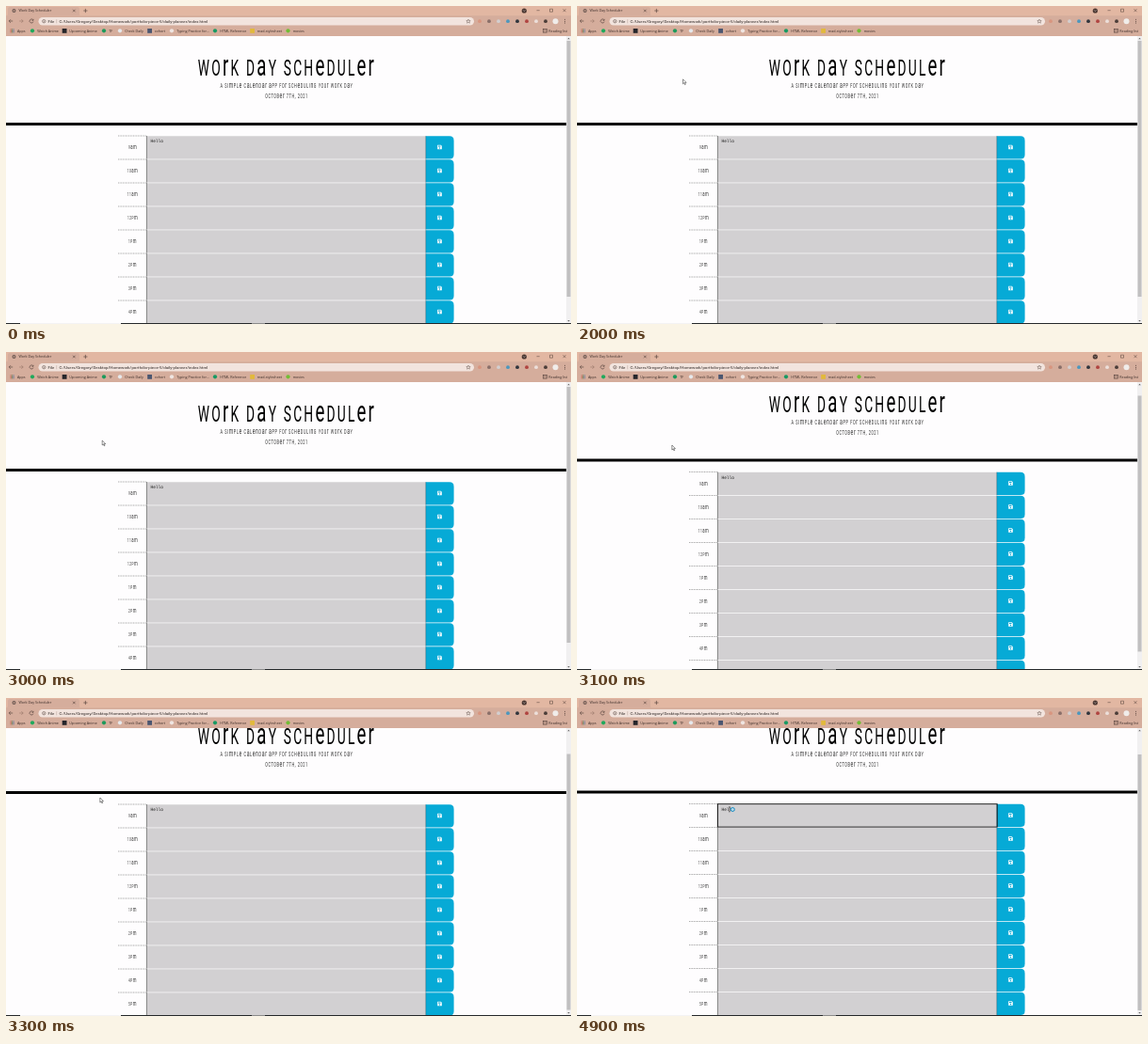
An HTML page for the animation above (5000 ms loop, 600x338 px).

```html
<!DOCTYPE html>
<html lang="en">
<head>
<meta charset="utf-8">
<title>Work Day Scheduler</title>
<style>
  html, body { margin: 0; width: 100%; height: 100%; overflow: hidden; background: #fff; }
  svg { display: block; width: 100vw; height: 100vh; }
  .ui { font-family: "Open Sans", "Noto Sans", sans-serif; font-size: 3.7px; fill: #3b2d29; }
  .url { font-family: Roboto, sans-serif; font-size: 4.4px; fill: #2d2523; }
  .display { font-family: Roboto, "Noto Sans", sans-serif; letter-spacing: .16em; text-anchor: middle; fill: #333; }
  .display .tall { font-size: 1.35em; }
  .title { fill: #000; }
  .note { font-family: "DejaVu Sans Mono", "Liberation Mono", monospace; font-size: 4.5px; fill: #222; }
</style>
</head>
<body>
<svg id="stage" viewBox="0 0 600 338"></svg>
<script>
const LOOP = 5000, STEP = 100, MAX_SCROLL = 25.5;
const ROW_TOP = 138, ROW_HEIGHT = 25;
const HOURS = ["9am", "10am", "11am", "12pm", "1pm", "2pm", "3pm", "4pm", "5pm"];

const rect = (x, y, w, h, fill, extra = "") =>
  `<rect x="${x}" y="${y}" width="${w}" height="${h}" fill="${fill}" ${extra}/>`;
const dot = (x, y, r, fill, extra = "") =>
  `<circle cx="${x}" cy="${y}" r="${r}" fill="${fill}" ${extra}/>`;
const line = (d, color, width = .6, extra = "") =>
  `<path d="${d}" fill="none" stroke="${color}" stroke-width="${width}" ${extra}/>`;
const label = (x, y, text, cls = "ui") => `<text x="${x}" y="${y}" class="${cls}">${text}</text>`;

// Condensed unicase lettering: a, e, m, n and r keep their small form at capital height.
function display(x, y, size, text, cls = "") {
  const letters = text.replace(/[aemnr]+|[^aemnr]+/g, part =>
    /[aemnr]/.test(part) ? `<tspan class="tall">${part}</tspan>` : part.toUpperCase());
  return `<text class="display ${cls}" font-size="${size}" xml:space="preserve"
    transform="translate(${x} ${y}) scale(.6 1)">${letters}</text>`;
}

function saveIcon(x, y) {
  return `<g transform="translate(${x} ${y})">
    <path d="M-2.3-2.2h3.6l1 1v3.4h-4.6z" fill="#fff"/>
    ${rect(-1.5, -1.5, 2.5, 1.1, "#06aad6")}${dot(0, 1, .7, "#06aad6")}</g>`;
}

function row(hour, i) {
  const y = ROW_TOP + i * ROW_HEIGHT;
  return line(`M119 ${y}H149`, "#777", .6, 'stroke-dasharray="1 .6"') +
    display(134.5, y + 14, 5.2, hour) +
    rect(149.5, y + .3, 296.5, 24.3, "#d2d0d2") +
    line(`M149.4 ${y}v24.7`, "#555", .7) +
    `<path d="M446 ${y + .3}h25q4.6 0 4.6 4.6v15q0 4.6-4.6 4.6h-25z" fill="#06aad6"/>` +
    line(`M445.8 ${y + .2}v24.5`, "#266f83", .6) +
    saveIcon(460.5, y + 12);
}

function page() {
  return display(298.5, 74, 23, "Work Day Scheduler", "title") +
    display(298, 87, 6.4, "A simple calendar app for scheduling your work day") +
    display(298, 98.3, 6.4, "October 7th, 2021") +
    rect(0, 124, 595, 3, "#000") +
    HOURS.map(row).join("") +
    label(153.5, 145, "Hello", "note") +
    `<rect id="focus" x="149.4" y="138.2" width="296.8" height="24.4" fill="none" stroke="#111" stroke-width=".9"/>`;
}

function bookmarks() {
  const items = [
    [28, "#1fa95b", "Watch Anime"], [62, "#25262b", "Upcoming Anime"], [104, "#1c9a5b", "TF"],
    [121, "#e6e9ec", "Check Daily"], [152.5, "#4b5670", "cohort"], [176, "#efe6e2", "Typing Practice for..."],
    [222, "#179a63", "HTML Reference"], [261.5, "#e2b93c", "read-stylesheet"], [299.5, "#72bd35", "movies"]
  ];
  let out = "";
  for (let i = 0; i < 9; i++)
    out += rect(4.6 + i % 3 * 1.5, 24.4 + Math.floor(i / 3) * 1.5, 1, 1, ["#b9513f", "#557b50", "#4b6c9c"][i % 3]);
  out += label(12, 27.8, "Apps");
  items.forEach(([x, color, text], i) => {
    out += i % 3 === 1 ? rect(x - 2.3, 24, 4.8, 4.8, color) : dot(x, 26.3, 2.1, color);
    out += label(x + 5.2, 27.8, text);
  });
  return out + rect(570.5, 24.5, 4, 3.6, "none", 'stroke="#4c3a34" stroke-width=".6"') +
    line("M571.4 25.7h2.3M571.4 27h2.3", "#4c3a34", .4) + label(576.3, 27.8, "Reading list");
}

function browser() {
  const ink = "#4c3a34";
  const extensions = ["#d8957f", "#8a6f69", "#d3cfd0", "#4d97bd", "#30353d", "#b04441", "#ecdfda", "#4b3d39"];
  return rect(0, 0, 600, 32, "#d5ad9c") + rect(0, 0, 600, 10.2, "#e2b7a2") +
    `<path d="M0 10.5q2 0 2-2V3q0-2 2-2h72q2 0 2 2v5.5q0 2 2 2z" fill="#d5ad9c"/>` +
    dot(8.5, 5, 2, "#6b5953") + dot(8.5, 5, 1, "#b99484") +
    label(13.5, 6.4, "Work Day Scheduler") +
    line("M71 3.7l2.6 2.6m0-2.6l-2.6 2.6M82.3 5h4.2M84.4 2.9v4.2", ink) +
    dot(550.3, 5, 2.6, "#4a3731") + line("M549.3 4.5l1 1 1-1", "#fff", .5) +
    line("M563.5 4.7h3.2M577.5 3.2h3v3h-3zM591.5 3.2l3 3m0-3l-3 3", ink, .5) +
    line("M7.2 16H3.2m1.8-1.8L3.2 16 5 17.8", ink) +
    line("M14.2 16h4m-1.8-1.8l1.8 1.8-1.8 1.8", "#947266") +
    line("M28.7 14.8a2 2 0 1 0 .3 1.8M29 13.8v1.5h-1.5", ink) +
    rect(34.5, 12, 462.5, 8.6, "#f2e4de", 'rx="4.3"') +
    dot(40.3, 16.2, 1.7, "none", `stroke="${ink}" stroke-width=".5"`) + line("M40.3 16v1.2M40.3 15v.4", ink, .5) +
    label(44.5, 17.7, "File", "url") + line("M53.7 14.2v4.2", "#a69189", .4) +
    label(56.5, 17.7, "C:/Users/Gregory/Desktop/Homework/portfolio-piece-5/daily-planner/index.html", "url") +
    line("M491 14l.6 1.5 1.6.1-1.2 1 .4 1.6-1.4-.9-1.4.9.4-1.6-1.2-1 1.6-.1z", ink, .4) +
    extensions.map((color, i) => dot(503 + i * 10, 16.2, 1.9, color)).join("") +
    dot(583.5, 16.2, 3, "#f0ece9") +
    [14.3, 16.2, 18.1].map(y => dot(593.5, y, .5, ink)).join("") + bookmarks();
}

const stage = document.getElementById("stage");
stage.innerHTML = `
  <clipPath id="view"><rect y="32" width="595" height="306"/></clipPath>
  ${rect(0, 0, 600, 338, "#fefdfe")}
  <g clip-path="url(#view)"><g id="page">${page()}</g></g>
  ${rect(595, 32, 5, 306, "#f1f0f1")}
  <rect id="thumb" x="595.5" width="4" height="272" fill="#c1c0c1"/>
  <path d="M596.2 35.2l1.3-1.5 1.3 1.5zM596.2 334l1.3 1.5 1.3-1.5z" fill="#666"/>
  ${browser()}
  ${rect(0, 337, 600, 1, "#25282a")}${rect(15, 337, 107, 1, "#f3f3f3")}${rect(261, 337, 14, 1, "#8b8b8b")}
  <path id="arrow" d="M0 0v5l1.2-1.1.8 1.9.8-.3-.8-1.9h1.6z" fill="#fff" stroke="#222" stroke-width=".5"/>
  <path id="beam" d="M-1-2.5h.7l.3.3.3-.3H1M0-2.2v4.4M-1 2.5h.7l.3-.3.3.3H1" fill="none" stroke="#222" stroke-width=".55"/>
  <circle id="busy" r="2" fill="#b9d9e8" stroke="#168ac0" stroke-width="1"/>`;

const part = Object.fromEntries(["page", "thumb", "focus", "arrow", "beam", "busy"]
  .map(id => [id, document.getElementById(id)]));

// Each key: time, then values
const pointerKeys = [
  [600, 55, 205], [800, 58, 172], [1100, 72.5, 133.3], [1300, 78, 116], [1500, 79, 115],
  [2000, 112.5, 77.8], [2400, 112.5, 77.8], [3000, 102.2, 94], [3200, 99.5, 104],
  [3500, 100.5, 110], [3900, 151.7, 141], [4100, 154, 138], [4600, 162, 118.3]
];
const scrollKeys = [[3000, 0], [3200, 21], [3300, 25], [3400, MAX_SCROLL]];

function sample(keys, t) {
  const next = keys.findIndex(key => key[0] > t);
  if (next === 0) return keys[0].slice(1);
  if (next < 0) return keys[keys.length - 1].slice(1);
  const a = keys[next - 1], b = keys[next], k = (t - a[0]) / (b[0] - a[0]);
  return a.slice(1).map((v, i) => v + (b[i + 1] - v) * k);
}

const show = (el, on) => el.setAttribute("visibility", on ? "visible" : "hidden");
const move = (el, x, y) => el.setAttribute("transform", `translate(${x} ${y})`);

function render(time) {
  const t = Math.floor(time % LOOP / STEP) * STEP;
  const [scroll] = sample(scrollKeys, t);
  const [x, y] = sample(pointerKeys, t);
  const overText = x > 150, focused = t >= 4800;
  move(part.page, 0, -scroll);
  part.thumb.setAttribute("y", 37 + scroll * .9);
  move(part.arrow, x, y);
  move(part.beam, x, y);
  move(part.busy, x + 3.3, y + .2);
  show(part.arrow, t >= 600 && !overText);
  show(part.beam, overText);
  show(part.busy, focused);
  show(part.focus, focused);
}

const start = performance.now();
function tick() {
  render(performance.now() - start);
  requestAnimationFrame(tick);
}
tick();
</script>
</body>
</html>
```
